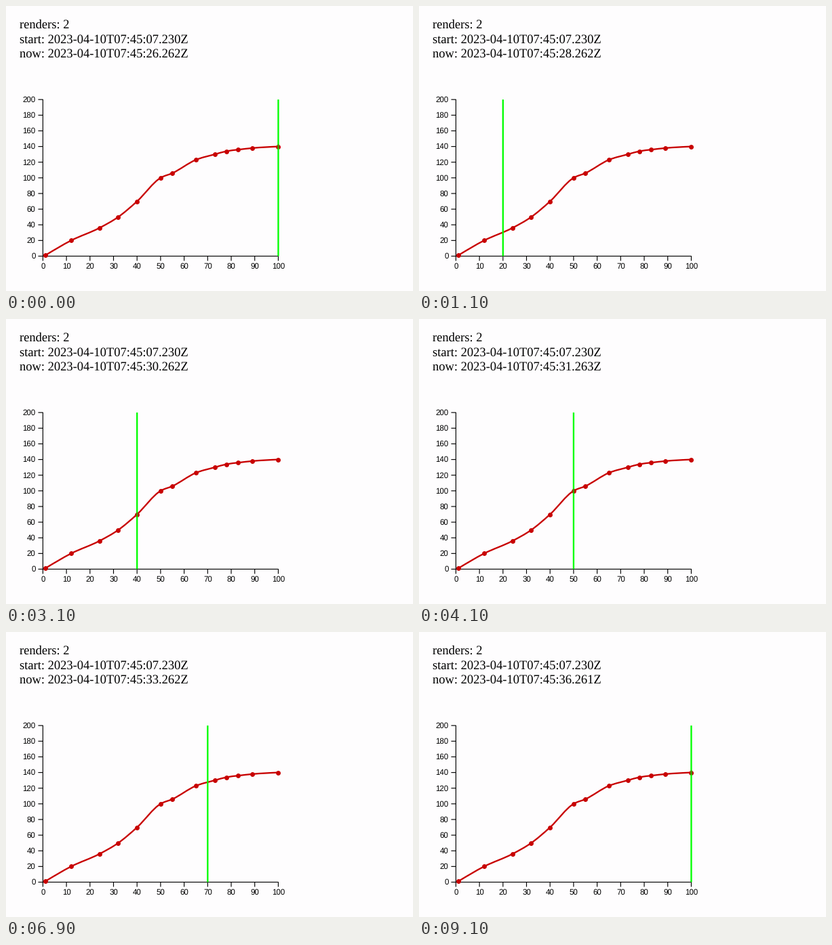
Write a matplotlib script that moves like this. It is 600 px wide and 421 px high and loops after 9600 ms.

```python
import numpy as np
import matplotlib.pyplot as plt
from matplotlib.animation import FuncAnimation
from matplotlib.path import Path
from matplotlib.patches import PathPatch

W, H, DPI = 600, 421, 64
PT = 72 / DPI                  # points per pixel
S = 347 / 300                  # zoom of the page
X0, Y0 = 54.4, 369.5           # chart origin in pixels
RED, LIME, INK = "#c80000", "#00ff00", "#000000"

POINTS = np.array([(1, 1), (12, 20), (24, 36), (32, 50), (40, 70), (50, 100),
                   (55, 106), (65, 123), (73, 130), (78, 134), (83, 136),
                   (89, 138), (100, 140)], float)
START_SECOND = 26
MILLIS = [262, 261, 262, 261, 262, 263, 262, 262, 261, 260, 261]

plt.rcParams["text.hinting"] = "none"
fig = plt.figure(figsize=(W / DPI, H / DPI), dpi=DPI, facecolor="#fefdfe")
ax = fig.add_axes([0, 0, 1, 1])
ax.set(xlim=(0, W), ylim=(H, 0))
ax.axis("off")


def px(x):
    return X0 + 3 * S * x


def py(y):
    return Y0 - S * y


def stroke(xs, ys, color=INK, width=1.0, z=1):
    line, = ax.plot(xs, ys, color=color, lw=width * S * PT, zorder=z,
                    solid_capstyle="butt", solid_joinstyle="miter", snap=False)
    return line


def label(x, y, s, size, font, ha="left"):
    return ax.text(x, y, s, fontsize=size * S * PT, family=font, color=INK,
                   ha=ha, va="baseline")


def monotone_path(pts):
    """Cubic path through pts that never overshoots between them."""
    h = np.diff(pts[:, 0])
    s = np.diff(pts[:, 1]) / h
    p = (s[:-1] * h[1:] + s[1:] * h[:-1]) / (h[:-1] + h[1:])
    inner = 2 * np.minimum(np.minimum(s[:-1], s[1:]), p / 2)
    slope = np.concatenate([[(3 * s[0] - inner[0]) / 2], inner,
                            [(3 * s[-1] - inner[-1]) / 2]])
    verts = [pts[0]]
    for i, dx in enumerate(h / 3):
        verts += [pts[i] + (dx, dx * slope[i]),
                  pts[i + 1] - (dx, dx * slope[i + 1]), pts[i + 1]]
    verts = np.array(verts)
    codes = [Path.MOVETO] + [Path.CURVE4] * (len(verts) - 1)
    return Path(np.column_stack([px(verts[:, 0]), py(verts[:, 1])]), codes)


# Axes
tick = 6 * S
stroke([X0 - tick, X0, X0, X0 - tick], [py(0), py(0), py(200), py(200)])
stroke([px(0), px(0), px(100), px(100)], [Y0 + tick, Y0, Y0, Y0 + tick])
for v in range(0, 101, 10):
    if 0 < v < 100:
        stroke([px(v)] * 2, [Y0, Y0 + tick])
    label(px(v), Y0 + 16.1 * S, str(v), 10, "Liberation Sans", "center")
for v in range(0, 201, 20):
    if 0 < v < 200:
        stroke([X0 - tick, X0], [py(v)] * 2)
    label(X0 - 9.4 * S, py(v) + 3.2 * S, str(v), 10, "Liberation Sans", "right")

# Curve and dots
ax.add_patch(PathPatch(monotone_path(POINTS), fc="none", ec=RED,
                       lw=2 * S * PT, zorder=2))
ax.plot(px(POINTS[:, 0]), py(POINTS[:, 1]), "o", color=RED, ms=6 * S * PT,
        mew=0, zorder=3, snap=False)

# Cursor, darkened where it covers a dot
cursor = stroke([0, 0], [py(200), py(0)], LIME, 2, z=4)
overlap = stroke([0, 0], [0, 0], "#4a8a00", 2, z=5)
dot_height = dict(POINTS.tolist())

# Header
label(19.7, 33, "renders: 2", 16, "Liberation Serif")
label(19.7, 54.4, "start: 2023-04-10T07:45:07.230Z", 16, "Liberation Serif")
now = label(19.7, 75.8, "", 16, "Liberation Serif")


def update(frame):
    step = (frame + 9) // 10
    value = 10 * step or 100
    cursor.set_xdata([px(value)] * 2)
    y = dot_height.get(value)
    overlap.set_visible(y is not None)
    if y is not None:
        overlap.set_data([px(value)] * 2, [py(y) - 2.6 * S, py(y) + 2.6 * S])
    now.set_text(f"now: 2023-04-10T07:45:{START_SECOND + step}.{MILLIS[step]}Z")
    return cursor, overlap, now


anim = FuncAnimation(fig, update, frames=96, interval=100, repeat=True,
                     repeat_delay=0, blit=False)
plt.show()
```
